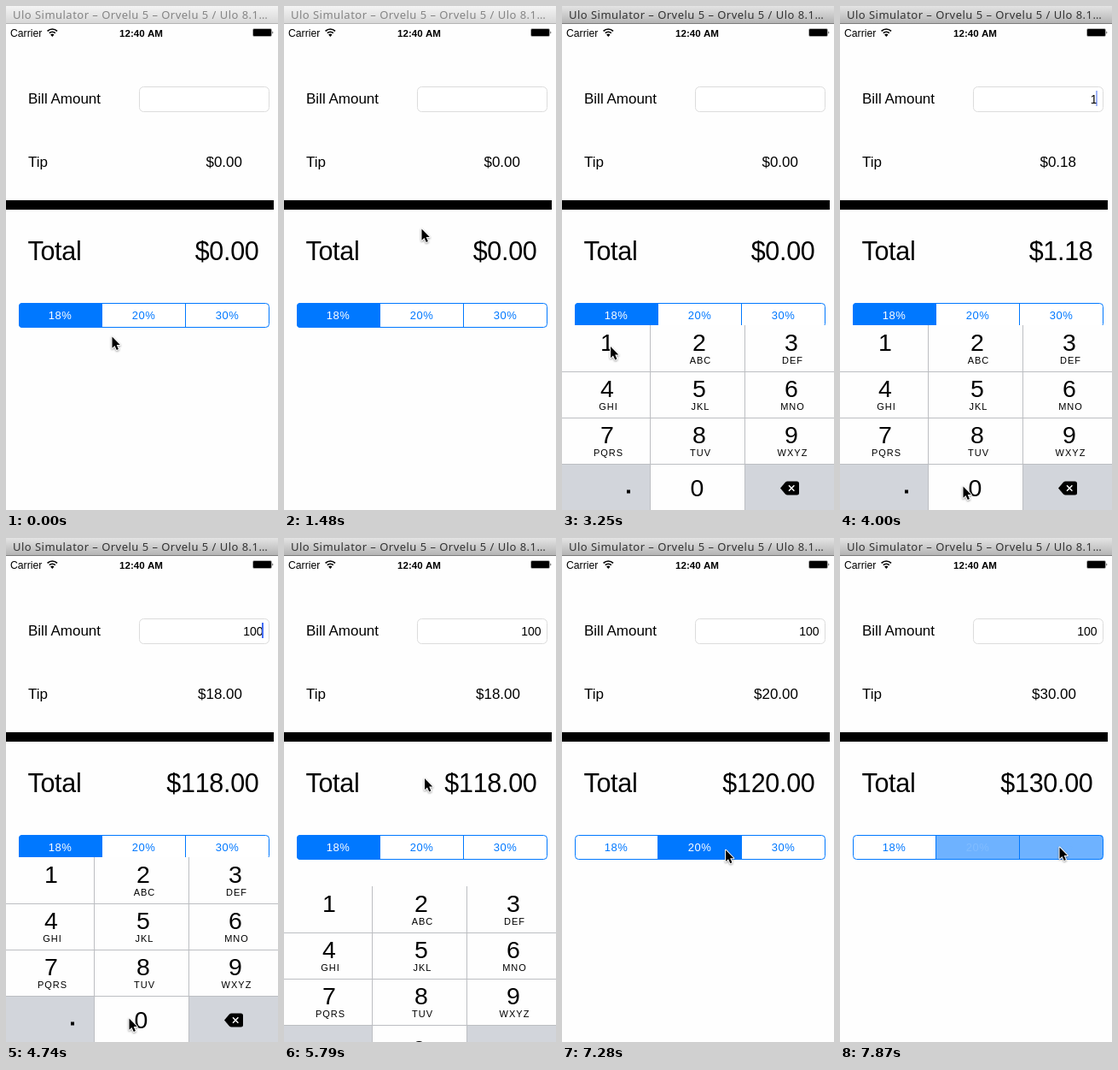
Animation, 319 px wide and 589 px high, one loop 8000 ms. Source, as an HTML page:

```html
<!DOCTYPE html>
<html lang="en">
<head>
<meta charset="utf-8">
<title>Tip calculator</title>
<style>
  html, body { margin: 0; width: 100%; height: 100%; overflow: hidden; background: #fefefe; }
  svg { display: block; width: 319px; height: 589px; }
  text { font-family: "Liberation Sans", Arial, sans-serif; font-kerning: none; }
  .title { font: 13px "Noto Sans", "Open Sans", sans-serif; letter-spacing: .47px; }
  .body { font-size: 17px; }
  .big { font-size: 30.5px; letter-spacing: -.3px; }
  .word { font-kerning: normal; }
  .seg { font-size: 13px; letter-spacing: .5px; }
  .digit { font-size: 28.5px; }
  .letters { font-size: 11px; letter-spacing: 1px; }
  .mid { text-anchor: middle; }
  .end { text-anchor: end; }
</style>
</head>
<body>
<svg viewBox="0 0 319 589">
  <defs>
    <linearGradient id="idle" x2="0" y2="1">
      <stop stop-color="#f4f4f4"/><stop offset="1" stop-color="#d6d6d6"/>
    </linearGradient>
    <linearGradient id="active" x2="0" y2="1">
      <stop stop-color="#e4e4e4"/><stop offset="1" stop-color="#b2b2b2"/>
    </linearGradient>
    <clipPath id="segClip"><rect x="15" y="347" width="294" height="29" rx="4"/></clipPath>
  </defs>
  <rect width="319" height="589" fill="#fefefe"/>

  <rect id="bar" width="319" height="21"/>
  <path id="barEdge" d="M0 20.5H319"/>
  <text id="title" class="title" x="8" y="15">Ulo Simulator – Orvelu 5 – Orvelu 5 / Ulo 8.1…</text>

  <text x="5" y="35.5" font-size="12.2">Carrier</text>
  <path d="M48.6 29.4a8 8 0 0 1 11.4 0M50.8 31.7a5 5 0 0 1 7 0" fill="none" stroke="#000" stroke-width="1.7"/>
  <path d="M54.3 36l-2.2-2.4a3.2 3.2 0 0 1 4.4 0z"/>
  <text class="mid" x="158.5" y="35.5" font-size="11.6" font-weight="bold">12:40 AM</text>
  <rect x="289.5" y="26.5" width="22" height="9" rx="1.5" fill="none" stroke="#aaa"/>
  <rect x="290" y="27" width="21" height="8" rx=".8"/>
  <path d="M312.500 29.300q1.800 1.700 0 3.400z"/>

  <text class="body word" x="26" y="114">Bill Amount</text>
  <rect x="156.5" y="94.5" width="152" height="29" rx="5" fill="#fff" stroke="#dcdcdc"/>
  <text id="bill" class="end" x="301.5" y="113.5" font-size="14"></text>
  <rect id="caret" x="300" y="99" width="2" height="18" fill="#426bf2"/>
  <text class="body word" x="26" y="188">Tip</text>
  <text id="tip" class="body end" x="277" y="188"></text>
  <rect y="227" width="314" height="11"/>
  <text class="big word" x="25.5" y="297">Total</text>
  <text id="total" class="big end" x="296.5" y="297"></text>

  <g id="segments"></g>
  <g id="keyboard"></g>
  <path id="cursor" d="M0 0V13.2L3 10.4L5.3 15.4L7.400 14.500L5.200 9.600H9.300Z"
    stroke="#fff" stroke-width="2" stroke-linejoin="round" paint-order="stroke"
    style="filter:drop-shadow(0 1px 1px rgba(0,0,0,.4))"/>
</svg>

<script>
const LOOP = 8000, STEP = 148.5, LEAD = 16;
const FOCUS = 16, BLUR = 37, TYPED = [24, 29, 32], AMOUNT = '100';
const PICKS = [{ at: 0, rate: .18 }, { at: 46, rate: .2 }, { at: 53, rate: .3 }];
const MOVES = [ // start, end, x, y
  [0, 1, 129, 389], [2, 6, 234, 538], [6, 10, 161.5, 260.5], [10, 14, 198.5, 112.5],
  [18, 22, 57, 398], [24, 26, 144.5, 561.5], [33, 37, 165, 281], [41, 45, 156.5, 366.5],
  [47, 52, 257.5, 361.5]
];
const KEYS_TOP = 373, KEYS_HEIGHT = 216, ROW = 54, COL = 111;
const BLUE = [0, 120, 255], KEY_GRAY = '#d2d5db';

const $ = id => document.getElementById(id);
const clamp = v => Math.min(1, Math.max(0, v));
const progress = (step, from, to) => clamp((step - from) / (to - from));
const smooth = k => k * k * (3 - 2 * k);

// 0 is white, 1 is the full blue
const tint = k => `rgb(${BLUE.map(c => Math.round(255 + (c - 255) * k))})`;

function buildSegments() {
  const w = 98, parts = PICKS.map(({ rate }, i) => {
    const x = 14.5 + i * w;
    return `<rect class="fill" x="${x}" y="347" width="${w}" height="29"/>
      <text class="seg mid" x="${x + w / 2}" y="366">${rate * 100}%</text>`;
  });
  $('segments').innerHTML = `<g clip-path="url(#segClip)">${parts.join('')}</g>
    <path d="M112.5 347V376M210.5 347V376" stroke="${tint(1)}"/>
    <rect x="15.5" y="347.5" width="293" height="28" rx="4" fill="none" stroke="${tint(1)}"/>`;
}

function buildKeyboard() {
  const words = ['', 'ABC', 'DEF', 'GHI', 'JKL', 'MNO', 'PQRS', 'TUV', 'WXYZ'];
  const key = (col, row, id = '') =>
    `<rect id="${id}" x="${col * COL - 7.5}" y="${row * ROW}" width="${COL}" height="${ROW}" fill="${KEY_GRAY}"/>`;
  let html = `<rect width="319" height="${KEYS_HEIGHT}" fill="#fefefe"/>`
    + key(0, 3, 'dot') + key(2, 3, 'erase') + key(0, 0, 'key1') + key(1, 3, 'key0')
    + '<path d="M0 54.5H319M0 108.5H319M0 162.5H319M103.5 0V216M214.5 0V216" stroke="#bcbec2"/>';
  words.forEach((word, i) => {
    const x = 53 + i % 3 * 108, y = Math.floor(i / 3) * ROW;
    html += `<text class="digit mid" x="${x}" y="${y + 30}">${i + 1}</text>
      <text class="letters mid" x="${x + 1.5}" y="${y + 45}">${word}</text>`;
  });
  html += `<text class="digit mid" x="158.5" y="200">0</text>
    <rect x="76" y="192.5" width="4" height="4"/>
    <path d="M256 190.5L262 183.5Q263 182.5 264.5 182.5H275.5Q278 182.5 278 185V196Q278 198.5 275.5 198.5H264.5Q263 198.5 262 197.5Z"/>
    <path d="M266 187.3L272.4 193.7M272.4 187.3L266 193.7" stroke="#fff" stroke-width="1.5"/>`;
  $('keyboard').innerHTML = html;
}

function cursorAt(step) {
  let x = 124.5, y = 386.5;
  for (const [from, to, toX, toY] of MOVES) {
    const k = smooth(progress(step, from, to));
    x += (toX - x) * k;
    y += (toY - y) * k;
  }
  return [x, y];
}

function keyboardOffset(step) {
  const hidden = (1 - progress(step, 14, 18)) ** 3 + smooth(progress(step, 38, 42));
  return KEYS_HEIGHT * hidden;
}

// The blink restarts with every typed digit
function caretOpacity(step) {
  if (step < FOCUS || step >= BLUR) return 0;
  const since = step - Math.max(FOCUS, ...TYPED.filter(t => t <= step));
  return clamp(3.5 - since % 7);
}

function paintSegments(step, chosen) {
  const fills = document.querySelectorAll('.fill'), labels = document.querySelectorAll('.seg');
  const fading = chosen > 0 && step === PICKS[chosen].at;
  PICKS.forEach(({ at }, i) => {
    let back = i === chosen ? 1 : 0, label = 1 - back;
    if (step === at - 1) back = .16;
    if (fading && (i === chosen || i === chosen - 1)) {
      back = .57;
      label = i === chosen ? back : .5;
    }
    fills[i].setAttribute('fill', tint(back));
    labels[i].setAttribute('fill', tint(label));
  });
}

function draw(time) {
  const step = Math.floor((time % LOOP + LEAD) / STEP);
  const active = step >= 14;
  $('bar').setAttribute('fill', active ? 'url(#active)' : 'url(#idle)');
  $('barEdge').setAttribute('stroke', active ? '#7c7c7c' : '#b4b4b4');
  $('title').setAttribute('fill', active ? '#333' : '#858585');

  const entry = AMOUNT.slice(0, TYPED.filter(t => t <= step).length);
  const chosen = PICKS.filter(p => p.at <= step).length - 1, { rate } = PICKS[chosen];
  $('bill').textContent = entry;
  $('tip').textContent = '$' + (entry * rate).toFixed(2);
  $('total').textContent = '$' + (entry * (1 + rate)).toFixed(2);
  $('caret').setAttribute('opacity', caretOpacity(step));
  paintSegments(step, chosen);

  const pressed = AMOUNT[TYPED.indexOf(step + 1)];
  for (const digit of '01') $('key' + digit).setAttribute('opacity', digit === pressed ? 1 : 0);
  $('keyboard').setAttribute('transform', `translate(0 ${Math.round(KEYS_TOP + keyboardOffset(step))})`);
  $('cursor').setAttribute('transform', `translate(${cursorAt(step)})`);
}

buildSegments();
buildKeyboard();
const start = performance.now();
function tick() {
  draw(performance.now() - start);
  requestAnimationFrame(tick);
}
tick();
</script>
</body>
</html>
```
